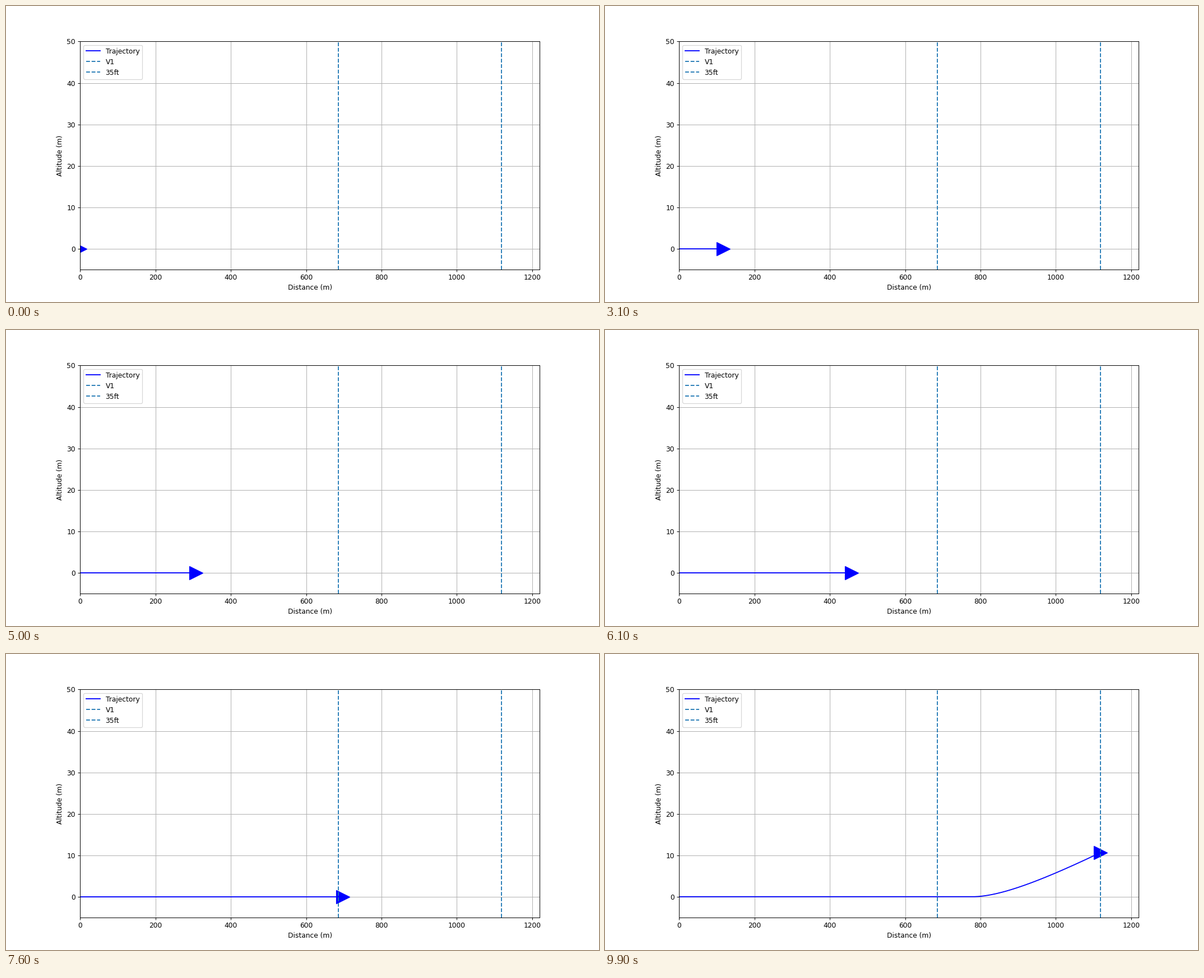
These frames come from a looping animation (1058x529 px, 10 s). A matplotlib script:

```python
import numpy as np
import matplotlib.pyplot as plt
from matplotlib.animation import FuncAnimation

FRAMES, INTERVAL = 100, 100
V1_X, SCREEN_X, LIFTOFF_X = 686, 1118.5, 778

plt.rcParams["font.family"] = "DejaVu Sans"


def distance(t):
    """Ground distance: constant thrust, with drag building up after 5 s."""
    t = np.asarray(t, dtype=float)
    run = 12.449 * t * np.maximum(t - 0.06, 0)
    return run - 1.10 * np.maximum(t - 5, 0) ** 2.8


def altitude(x):
    """Flat until lift-off, then a curve that straightens into a steady climb."""
    u = np.maximum(x - LIFTOFF_X, 0)
    return u ** 2 / (4231 + 19.55 * u)


# 12 x 6 inches at this dpi is 1058 x 529 pixels.
fig, ax = plt.subplots(figsize=(12, 6), dpi=88.167)
ax.set_xlim(0, 1220)
ax.set_ylim(-5, 50)
ax.set_xlabel("Distance (m)")
ax.set_ylabel("Altitude (m)")
ax.grid(True)

path, = ax.plot([], [], color="blue", label="Trajectory")
plane, = ax.plot([], [], ">", color="blue", markersize=20)
ax.axvline(V1_X, linestyle="--", label="V1", color="C0")
ax.axvline(SCREEN_X, linestyle="--", label="35ft", color="C0")
ax.legend(loc="upper left")


def update(frame):
    now = frame * INTERVAL / 1000
    x = distance(np.linspace(0, now, 4 * frame + 1))
    y = altitude(x)
    path.set_data(x, y)
    plane.set_data(x[-1:], y[-1:])
    return path, plane


anim = FuncAnimation(fig, update, frames=FRAMES, interval=INTERVAL,
                     repeat=True, repeat_delay=0)
plt.show()
```
